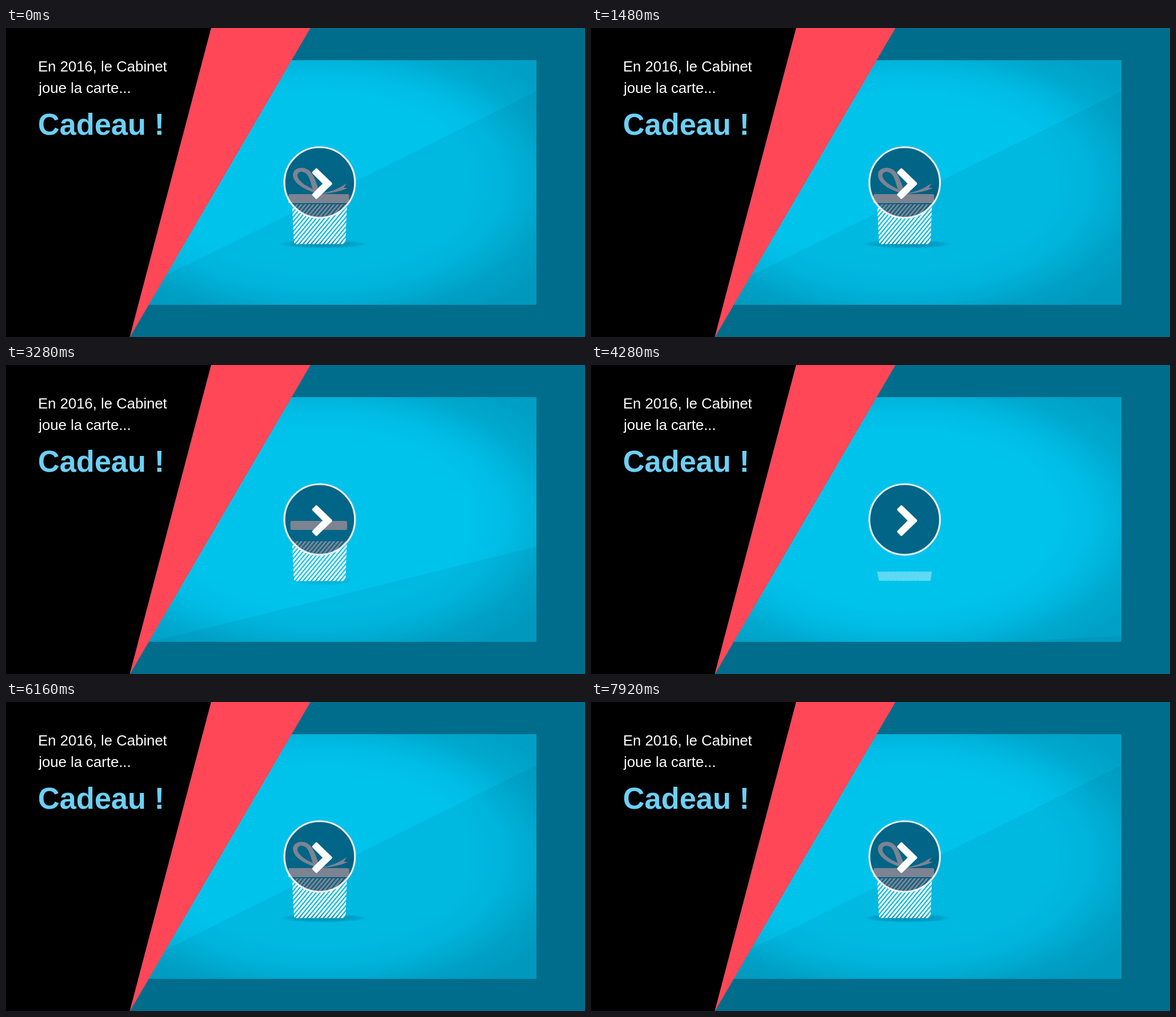
An HTML page with a canvas that plays this animation: 1025x547 px, repeating every 8000 ms.

```html
<!DOCTYPE html>
<html lang="fr">
<head>
<meta charset="utf-8">
<title>Cadeau</title>
<style>
html, body { margin: 0; width: 100%; height: 100%; overflow: hidden; background: #006d8c; }
canvas { display: block; width: 100%; height: 100%; }
</style>
</head>
<body>
<canvas id="stage" width="1025" height="547"></canvas>
<script>
const ctx = document.getElementById('stage').getContext('2d');
const LOOP = 8000, STEP = 40;
const BACK = 1.2;

const clamp = v => Math.max(0, Math.min(1, v));
const span = (t, start, end) => clamp((t - start) / (end - start));
const backIn = p => p * p * ((BACK + 1) * p - BACK);
const backOut = p => 1 - backIn(1 - p);
const easeIn = p => p * p;
const easeOut = p => 1 - (1 - p) ** 3;

function poly(points, color) {
  ctx.beginPath();
  points.forEach(([x, y]) => ctx.lineTo(x, y));
  ctx.closePath();
  ctx.fillStyle = color;
  ctx.fill();
}

function layer(draw) {
  ctx.save();
  draw();
  ctx.restore();
}

function scaleAt(x, y, sx, sy = sx) {
  ctx.translate(x, y);
  ctx.scale(sx, sy);
  ctx.translate(-x, -y);
}

// Everything that moves, as a function of time.
function pose(t) {
  const leaving = t < 4000;
  if (leaving) {
    const lidOut = easeIn(span(t, 3080, 3400));
    const fall = easeIn(span(t, 3280, 3720));
    return {
      ray: 1 - backIn(span(t, 2560, 3400)),
      loop: 1 - backIn(span(t, 2720, 3120)),
      tail: 1 - backIn(span(t, 2640, 2960)),
      lidY: -46 * lidOut,
      lidScale: 1 - 0.17 * lidOut,
      lidAlpha: 1 - span(t, 3280, 3440),
      body: 1 - fall,
      bodyAlpha: 1 - span(t, 3560, 3720),
      shadow: 1 - span(t, 2960, 3480),
      wobble: 0
    };
  }
  const lidIn = backOut(span(t, 4640, 5000));
  const shake = t - 6800;
  return {
    ray: backOut(span(t, 4245, 5445)),
    loop: backOut(span(t, 4900, 5260)),
    tail: backOut(span(t, 5200, 5520)),
    lidY: -46 * (1 - lidIn),
    lidScale: 0.83 + 0.17 * lidIn,
    lidAlpha: span(t, 4620, 4740),
    body: backOut(span(t, 4244, 4844)),
    bodyAlpha: span(t, 4220, 4320),
    shadow: easeOut(span(t, 4480, 4960)),
    wobble: shake > 0 ? Math.sin(shake * Math.PI / 240) * (1 - span(t, 6920, 7920)) : 0
  };
}

function drawPanel(ray) {
  layer(() => {
    ctx.beginPath();
    ctx.rect(171, 57, 768, 433);
    ctx.clip();
    ctx.fillStyle = '#00c3ec';
    ctx.fillRect(171, 57, 768, 433);

    const slope = 0.497 * ray;
    poly([[102, 528], [939, 528 - 837 * slope], [939, 528]], 'rgba(0,50,75,0.065)');

    ctx.translate(555, 273);
    ctx.scale(1, 0.58);
    const shade = ctx.createRadialGradient(0, 0, 0, 0, 0, 480);
    [[0.55, 0], [0.68, 0.04], [0.78, 0.11], [0.86, 0.18], [1, 0.24]].forEach(([at, alpha]) =>
      shade.addColorStop(at, `rgba(0,50,75,${alpha})`));
    ctx.fillStyle = shade;
    ctx.fillRect(-384, -380, 768, 760);
  });
}

function drawShadow(amount) {
  if (amount <= 0) return;
  layer(() => {
    ctx.globalAlpha = amount;
    ctx.translate(561, 382.5);
    ctx.scale(0.5 + 0.5 * amount, 0.1);
    const soft = ctx.createRadialGradient(0, 0, 30, 0, 0, 78);
    soft.addColorStop(0, 'rgba(0,100,135,0.45)');
    soft.addColorStop(0.7, 'rgba(0,100,135,0.22)');
    soft.addColorStop(1, 'rgba(0,100,135,0)');
    ctx.fillStyle = soft;
    ctx.beginPath();
    ctx.arc(0, 0, 78, 0, 7);
    ctx.fill();
  });
}

function drawBody(p) {
  if (p.body <= 0 || p.bodyAlpha <= 0) return;
  const right = Math.max(0, p.wobble), left = Math.max(0, -p.wobble);
  layer(() => {
    ctx.globalAlpha = p.bodyAlpha;
    scaleAt(555, 382, 1, p.body);
    const lx = 510 - 5 * left, ly = 382.5 + 2 * left;
    const rx = 601 + 5 * right, ry = 382.5 + 2 * right;
    ctx.beginPath();
    ctx.moveTo(506.5, 312);
    ctx.arcTo(lx, ly, rx, ry, 4);
    ctx.arcTo(rx, ry, 603.5, 312, 4);
    ctx.lineTo(603.5, 312);
    ctx.closePath();
    ctx.clip();
    ctx.strokeStyle = '#fff';
    ctx.lineWidth = 3.3;
    ctx.beginPath();
    for (let x = 436.8; x < 610; x += 7.2) {
      ctx.moveTo(x, 390);
      ctx.lineTo(x + 70, 306);
    }
    ctx.stroke();
  });
}

function drawBow(loop, tail) {
  ctx.fillStyle = '#fff';
  if (loop > 0) layer(() => {
    scaleAt(555, 293, loop);
    ctx.fill(new Path2D(
      'M557 294 C536 290 508 277 508 260 C508 249 521 245 531 249 C545 254 549 276 557 294 Z' +
      'M543 285 C530 279 516 270 516 261 C516 254 523 253 529 256 C537 260 539 274 543 285 Z'
    ), 'evenodd');
  });
  if (tail > 0) layer(() => {
    scaleAt(555, 293, tail);
    ctx.fill(new Path2D(
      'M555 293 C572 291 587 286 603 275 L598 283 L605 283 C591 290 575 292 555 294 Z'
    ));
  });
}

function drawLid(p) {
  if (p.lidAlpha <= 0) return;
  layer(() => {
    ctx.globalAlpha = p.lidAlpha;
    ctx.translate(0, p.lidY);
    scaleAt(554, 302, p.lidScale, 1);
    ctx.translate(554, 302 - Math.abs(p.wobble));
    ctx.rotate(-0.03 * p.wobble);
    ctx.translate(-554, -302);
    drawBow(p.loop, p.tail);
    ctx.fillStyle = '#fff';
    ctx.beginPath();
    ctx.roundRect(500, 294, 107.5, 16, 3);
    ctx.fill();
  });
}

function drawButton() {
  ctx.beginPath();
  ctx.arc(555.3, 273.5, 62.5, 0, 7);
  ctx.fillStyle = 'rgba(0,12,40,0.51)';
  ctx.fill();
  ctx.strokeStyle = '#efefef';
  ctx.lineWidth = 3.2;
  ctx.stroke();

  // Chevron with softened corners.
  poly([[549.5, 251], [575, 275.5], [549.5, 300], [544.5, 295], [564, 275.5], [544.5, 256]], '#fff');
  ctx.strokeStyle = '#fff';
  ctx.lineWidth = 5;
  ctx.lineJoin = 'round';
  ctx.stroke();
}

function drawTitle() {
  poly([[363, 0], [539, 0], [219.5, 547], [219, 547]], '#ff4757');
  poly([[0, 0], [363, 0], [219, 547], [0, 547]], '#000');

  const family = '"Liberation Sans", Arial, sans-serif';
  ctx.fillStyle = '#fff';
  ctx.font = `26px ${family}`;
  ctx.fillText('En 2016, le Cabinet', 56.7, 76.5);
  ctx.fillText('joue la carte...', 58, 114.5);
  ctx.fillStyle = '#6cd0f6';
  ctx.font = `bold 53px ${family}`;
  ctx.fillText('Cadeau !', 56.5, 188.5);
}

function render(t) {
  const p = pose(t);
  ctx.fillStyle = '#006d8c';
  ctx.fillRect(0, 0, 1025, 547);
  drawPanel(p.ray);
  drawShadow(p.shadow);
  drawBody(p);
  drawLid(p);
  drawButton();
  drawTitle();
}

const began = performance.now();
function tick() {
  const t = (performance.now() - began) % LOOP;
  render(Math.floor(t / STEP) * STEP);
  requestAnimationFrame(tick);
}
tick();
</script>
</body>
</html>
```
